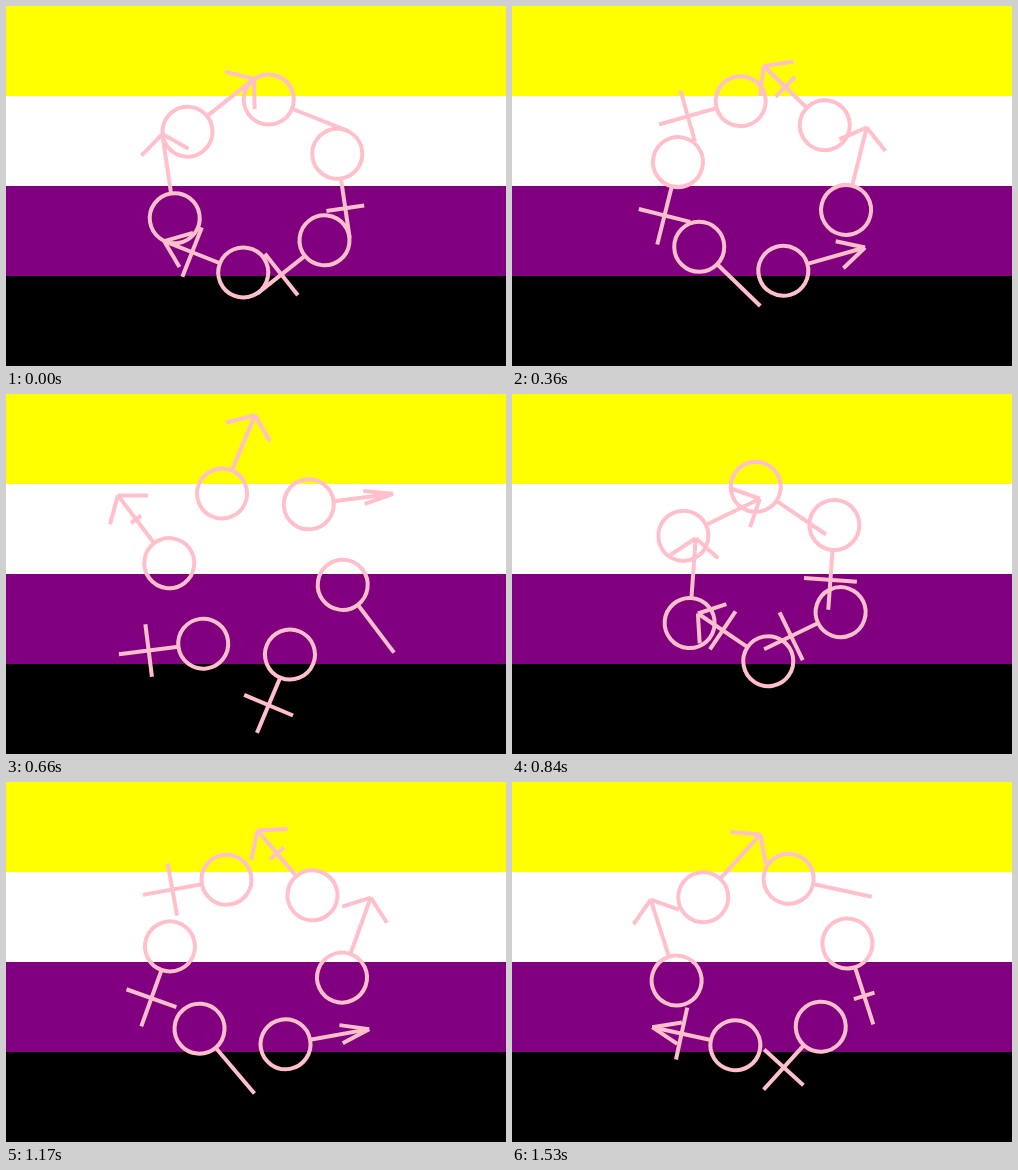
Animation of 500 by 360 pixels, one loop 1560 ms. Source, as an HTML page with a canvas:

```html
<!DOCTYPE html>
<html lang="en">
<head>
<meta charset="utf-8">
<title>Turning symbols</title>
<style>
  html, body { margin: 0; width: 100%; height: 100%; overflow: hidden; }
  canvas { display: block; }
</style>
</head>
<body>
<canvas id="stage" width="500" height="360"></canvas>
<script>
const ctx = document.getElementById('stage').getContext('2d');
const LOOP = 1560, STEP = 30;
const RING = 87.4, RADIUS = 25, TIP = 85, BAR_AT = 55, BAR_HALF = 26.5;
const ARM = 30, ARM_ANGLE = 52.5;
const START = 21.6, TURN = 0.12 * 180 / Math.PI;
const BANDS = ['#ffff00', '#ffffff', '#800080', '#000000'];

const rad = deg => deg * Math.PI / 180;
const clamp = v => Math.max(0, Math.min(1, v));

// Rises over 30 degrees from `from`, falls over the last 30 before `to`.
const ramp = (deg, from, to) => clamp(Math.min(deg - from, to - deg) / 30);

function line(x1, y1, x2, y2) {
  ctx.beginPath();
  ctx.moveTo(x1, y1);
  ctx.lineTo(x2, y2);
  ctx.stroke();
}

// The heading of a symbol decides which marks it carries.
function drawSymbol(place, heading) {
  const deg = (heading % 360 + 360) % 360;
  const bar = BAR_HALF * ramp(deg, 60, 240);
  const open = ramp(deg, 180, 360);

  ctx.save();
  ctx.translate(250 + RING * Math.cos(rad(place)), 180 + RING * Math.sin(rad(place)));
  ctx.rotate(rad(deg));
  ctx.beginPath();
  ctx.arc(0, 0, RADIUS, 0, 2 * Math.PI);
  ctx.stroke();
  line(RADIUS, 0, TIP, 0);
  if (bar > 0) line(BAR_AT, -bar, BAR_AT, bar);
  if (open > 0) {
    const a = rad(ARM_ANGLE * open);
    const x = TIP - ARM * Math.cos(a), y = ARM * Math.sin(a);
    line(TIP, 0, x, y);
    line(TIP, 0, x, -y);
  }
  ctx.restore();
}

function draw(time) {
  const angle = START + TURN * Math.floor(time % LOOP / STEP);
  BANDS.forEach((color, i) => {
    ctx.fillStyle = color;
    ctx.fillRect(0, i * 90, 500, 90);
  });
  ctx.strokeStyle = '#ffc0cb';
  ctx.lineWidth = 4;
  for (let i = 0; i < 6; i++) {
    drawSymbol(i * 60 - 60 - angle, i * 60 + angle);
  }
}

function tick() {
  draw(performance.now());
  requestAnimationFrame(tick);
}
tick();
</script>
</body>
</html>
```
